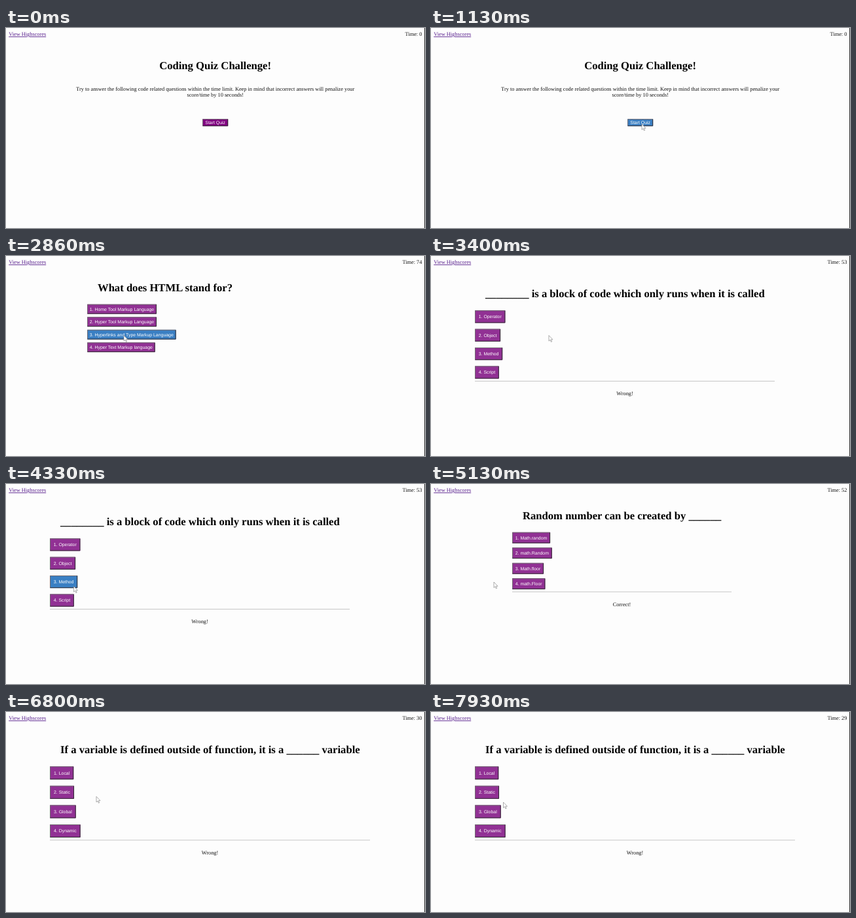
Recreate the animation shown at these times as an HTML page. Size 640 by 306 pixels, loop 8 s.

```html
<!DOCTYPE html>
<html lang="en">
<head>
<meta charset="utf-8">
<title>Coding Quiz</title>
<style>
  html, body { margin: 0; width: 100%; height: 100%; overflow: hidden; background: #fdfdfd; }
  svg { display: block; width: 640px; height: 306px; }
  text { font: 8.32px "Liberation Serif", "Times New Roman", serif; fill: #111; text-rendering: geometricPrecision; }
  .title { font-size: 16.64px; font-weight: bold; fill: #000; }
  .mid { text-anchor: middle; }
  .link { fill: #551a8b; text-decoration: underline; }
  .button text { font: 6.93px "Liberation Sans", Arial, sans-serif; fill: #fff; }
  .button rect { fill: #913194; }
  .button.start rect { fill: #800080; }
  .button.hover rect { fill: #3a7fc3; }
  .edge { fill: none; stroke-width: 1; }
  .light { stroke: #706a70; }
  .dark { stroke: #2f2a30; }
  .rule { stroke: #c6c6c6; }
</style>
</head>
<body>
<svg id="stage" viewBox="0 0 640 306">
  <rect width="640" height="306" fill="#fdfdfd"/>
  <text class="link" x="4.2" y="12">View Highscores</text>
  <text id="time" x="635.4" y="12" text-anchor="end">Time: 0</text>
  <g id="screens"></g>
  <path id="cursor" d="M0 0V8.6L2 6.8 3.4 10 4.7 9.4 3.3 6.3H6Z" fill="#fff" stroke="#777" stroke-width=".6"/>
  <rect x="639" width="1" height="306" fill="#333"/>
</svg>
<script>
const LOOP = 8000, FPS = 15;
const $ = id => document.getElementById(id);

function add(parent, tag, attrs, content = "") {
  const el = document.createElementNS("http://www.w3.org/2000/svg", tag);
  for (const name in attrs) el.setAttribute(name, attrs[name]);
  el.textContent = content;
  return parent.appendChild(el);
}

function addButton(parent, label, x, y, h, pad, kind = "") {
  const el = add(parent, "g", { class: "button " + kind });
  const box = add(el, "rect", { x, y, height: h });
  const text = add(el, "text", { x: x + pad, y: y + h / 2 + 2.4 }, label);
  const w = text.getComputedTextLength() + 2 * pad;
  box.setAttribute("width", w);
  const l = x + .5, t = y + .5, r = x + w - .5, b = y + h - .5;
  add(el, "path", { class: "edge light", d: `M${l} ${b}V${t}H${r}` });
  add(el, "path", { class: "edge dark", d: `M${r} ${t}V${b}H${l}` });
  return { el, hit: (px, py) => px >= x && px <= x + w && py >= y && py <= y + h };
}

function startScreen() {
  const g = add($("screens"), "g", {});
  add(g, "text", { class: "title mid", x: 319.6, y: 63 }, "Coding Quiz Challenge!");
  add(g, "text", { class: "mid", x: 319.7, y: 96 },
    "Try to answer the following code related questions within the time limit. Keep in mind that incorrect answers will penalize your");
  add(g, "text", { class: "mid", x: 319.7, y: 105.3 }, "score/time by 10 seconds!");
  return { from: 0, g, buttons: [addButton(g, "Start Quiz", 300.2, 139.2, 11, 4.1, "start")] };
}

function question(q) {
  const g = add($("screens"), "g", {});
  add(g, "text", { class: "title", x: q.x + 16, y: q.y - 20.3 }, q.title);
  const buttons = q.answers.map((label, i) =>
    addButton(g, `${i + 1}. ${label}`, q.x, q.y + i * q.pitch, q.h, q.pad));
  if (q.result) {
    add(g, "path", { class: "rule", d: `M${q.x} ${q.rule}H${q.right}` });
    add(g, "text", { class: "mid", x: (q.x + q.right) / 2, y: q.rule + 21.7 }, q.result);
  }
  return { from: q.from, g, buttons };
}

// All times below count steps of 1/15 s.
const screens = [
  startScreen(),
  question({ from: 20, x: 124, y: 73.8, pitch: 19.5, h: 14.8, pad: 3.8,
    title: "What does HTML stand for?",
    answers: ["Home Tool Markup Language", "Hyper Tool Markup Language",
      "Hyperlinks and Type Markup Language", "Hyper Text Markup language"] }),
  question({ from: 48, x: 67, y: 83.2, pitch: 28.4, h: 19.2, pad: 5.7,
    title: "________ is a block of code which only runs when it is called",
    answers: ["Operator", "Object", "Method", "Script"],
    rule: 191.5, right: 525, result: "Wrong!" }),
  question({ from: 74, x: 124, y: 73.8, pitch: 23.5, h: 16.8, pad: 4.8,
    title: "Random number can be created by ______",
    answers: ["Math.random", "math.Random", "Math.floor", "math.Floor"],
    rule: 165, right: 459, result: "Correct!" }),
  question({ from: 102, x: 67, y: 83.2, pitch: 29.6, h: 20, pad: 6,
    title: "If a variable is defined outside of function, it is a ______ variable",
    answers: ["Local", "Static", "Global", "Dynamic"],
    rule: 196, right: 556, result: "Wrong!" })
];

const clock = [[0, 0], [35, 74], [48, 54], [50, 53], [66, 52], [80, 51], [95, 50], [102, 30], [110, 29]];

const path = [
  [3, 352, 235], [13, 322, 147], [27, 322, 147], [31, 172, 180], [32, 172, 180],
  [33, 166, 175.5], [43, 180, 121.5], [61, 180, 121.5], [65, 103.5, 156.5],
  [68, 98, 171], [71, 96, 150], [86, 96, 150], [95, 138, 129.3], [113, 138, 129.3], [119, 110.5, 138]
];

function cursorAt(step) {
  const i = path.findIndex(p => p[0] >= step);
  if (i <= 0) return path[0].slice(1);
  const [t0, x0, y0] = path[i - 1], [t1, x1, y1] = path[i];
  const f = (step - t0) / (t1 - t0);
  return [x0 + (x1 - x0) * f, y0 + (y1 - y0) * f];
}

function draw(ms) {
  const step = Math.floor((ms % LOOP + 7) * FPS / 1000) % (LOOP * FPS / 1000);
  const visible = step >= path[0][0];
  const [x, y] = cursorAt(step);
  const current = screens.findLast(s => s.from <= step);
  for (const s of screens) s.g.style.display = s === current ? "" : "none";
  for (const b of current.buttons) b.el.classList.toggle("hover", visible && b.hit(x, y));
  $("time").textContent = "Time: " + clock.findLast(c => c[0] <= step)[1];
  $("cursor").style.display = visible ? "" : "none";
  $("cursor").setAttribute("transform", `translate(${x} ${y})`);
}

const begin = performance.now();
function tick() {
  draw(performance.now() - begin);
  requestAnimationFrame(tick);
}
tick();
</script>
</body>
</html>
```
